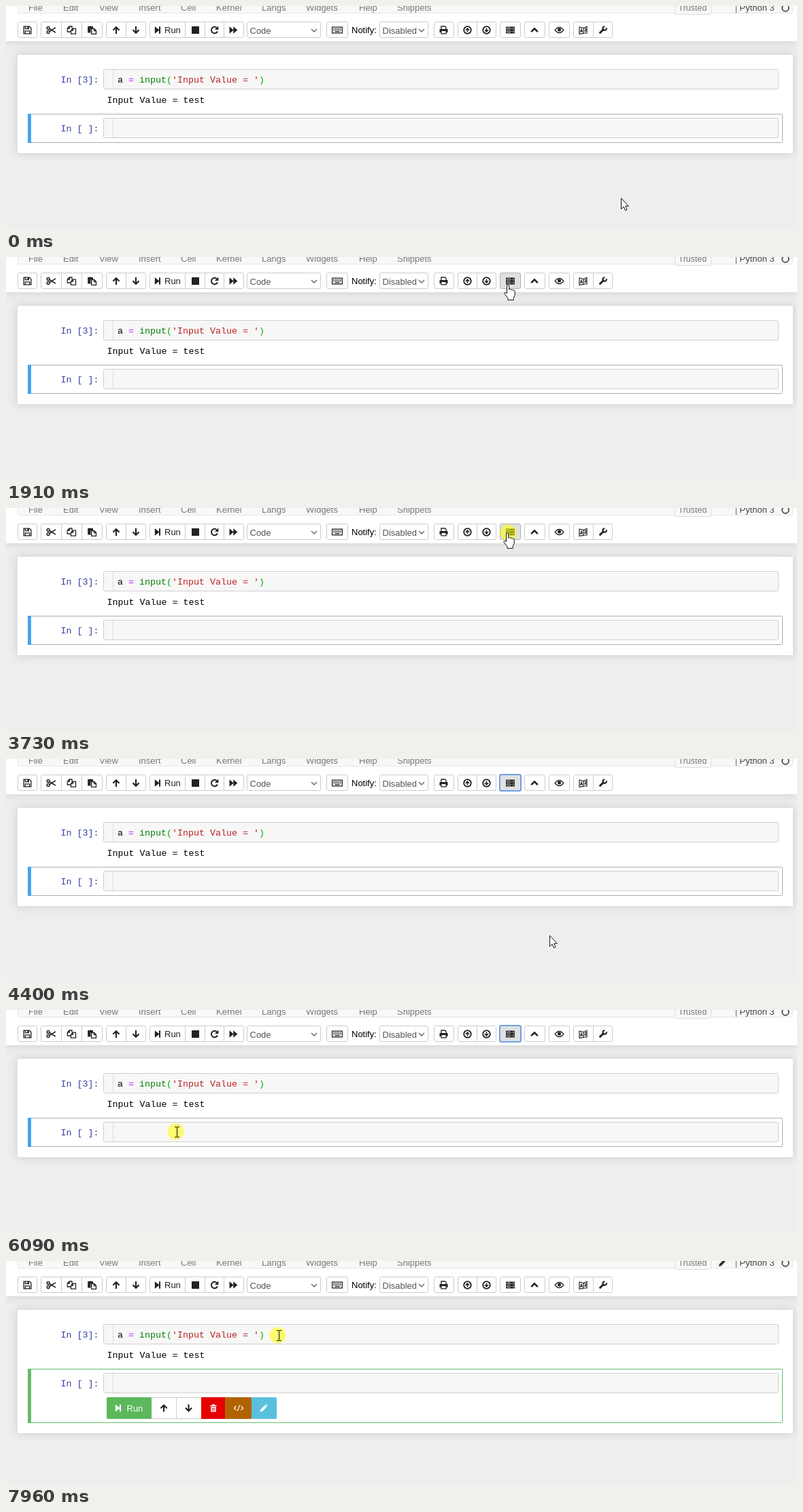
Animation of 1163 by 329 pixels, one loop 8000 ms. Source, as an HTML page:

```html
<!DOCTYPE html>
<html lang="en">
<head>
<meta charset="utf-8">
<title>Notebook with floating cell menu</title>
<style>
  html, body { margin: 0; width: 100%; height: 100%; overflow: hidden; background: #eee; }
  #stage { position: relative; width: 1163px; height: 329px; overflow: hidden; background: #eee; }
  #page, #header { position: absolute; background: #fff; box-shadow: 0 0 12px 1px rgba(87, 87, 87, .2); }
  #page { left: 17px; top: 72px; width: 1140px; height: 145px; }
  #header { left: 0; top: 0; width: 1163px; height: 52px; }
  svg { position: absolute; left: 0; top: 0; }
  text { font: 13px "Liberation Sans", Arial, sans-serif; white-space: pre; }
  .code { font: 13.33px "Liberation Mono", monospace; }
  .tip { font: 11.5px "Open Sans", "Noto Sans", sans-serif; }
</style>
</head>
<body>
<div id="stage">
  <div id="page"></div>
  <div id="header"></div>
  <svg id="art" width="1163" height="329" viewBox="0 0 1163 329"></svg>
</div>
<script>
const LOOP = 8000;
const $ = id => document.getElementById(id);

// ---- drawing helpers ----
const box = (x, y, w, h, fill, stroke = 'none', r = 0, extra = '') =>
  `<rect x="${x}" y="${y}" width="${w}" height="${h}" rx="${r}" fill="${fill}" stroke="${stroke}" ${extra}/>`;
const text = (x, y, s, fill = '#000', cls = '', extra = '') =>
  `<text x="${x}" y="${y}" fill="${fill}" class="${cls}" ${extra}>${s}</text>`;
const line = (d, w = 1.3, color = 'currentColor') =>
  `<path d="${d}" fill="none" stroke="${color}" stroke-width="${w}"/>`;
const solid = (d, color = 'currentColor') => `<path d="${d}" fill="${color}"/>`;
const at = (x, y, body, color = '#222') =>
  `<g transform="translate(${x} ${y})" color="${color}">${body}</g>`;

const up = line('M0 5.5V-4M-4.6 .3L0-4.3 4.6 .3', 2.1);
const down = `<g transform="scale(1 -1)">${up}</g>`;
const ring = '<circle r="5.3" fill="none" stroke="currentColor" stroke-width="1.8"/>';
const pencil = solid('M-5.5 5.5l.8-3.5L1.5-4.2l2.7 2.7-6.2 6.2zM2.3-5l1-1 2.7 2.7-1 1z');

const icons = {
  save: line('M-5.4-5.4h8.4l2.4 2.4v8.4h-10.8zM-3.2 5.4v-4h6.4v4M-3.2-5.4v3.6h5v-3.6') + solid('M0-5h2v3h-2z'),
  cut: line('M-2.5-2L6.5 3.6M-2.5 2L6.5-3.6', 1.7) +
    '<g fill="none" stroke="currentColor" stroke-width="1.5"><circle cx="-4.4" cy="-3" r="1.9"/><circle cx="-4.4" cy="3" r="1.9"/></g>',
  copy: line('M-1 5.6v-5l3-3h4v8zM2-2.4v3h-3M-1.5 2.5h-4.7v-5l3-3h3.7v3.2M-3.2-5.5v3h-3'),
  paste: solid('M-6.3-5.5h2.5q1-1.4 2 0h3.3v3h-3.5v6.5h-4.3z') + line('M-.8-2h4l2.8 2.8v5h-6.8zM3-2v3h3'),
  step: solid('M-4.2-5.2l6.2 4.7v-4.7h2v10.4h-2v-4.7l-6.2 4.7z'),
  stop: solid('M-5.5-5.5h11v11h-11z'),
  redo: line('M3.4-3.4A4.7 4.7 0 1 0 4.4 2', 2) + solid('M5.8-6v5.4h-5.4z'),
  skip: solid('M-6-5.2l5.8 5v-5l6 5.2-6 5.2v-5l-5.8 5z'),
  keys: line('M-7.4-4.4h14.8v8.8h-14.8z') +
    '<path d="M-5.5-2h11M-5.5 0h11" stroke="currentColor" stroke-width="1.3" stroke-dasharray="1.4 1"/>' + line('M-3.5 2.2h7'),
  print: solid('M-6-1.5h12v5h-2v-2h-8v2h-2z') + line('M-3.6-1.5v-4h5.5l1.7 1.7v2.3M-3.6 1.5v3.8h7.2v-3.8'),
  circleUp: ring + line('M0 3V-2M-2.6 .3L0-2.3 2.6 .3', 1.6),
  circleDown: ring + line('M0-3V2M-2.6-.3L0 2.3 2.6-.3', 1.6),
  list: [-5, -1.5, 2].map(y => box(-6.5, y, 13, 3, 'currentColor', 'none', .5) +
    line(`M-5 ${y + 1.5}h${y ? 5 : 3}M3.8 ${y + 1.5}h1.4`, .8, '#ddd')).join(''),
  chevron: line('M-4.8 2.6L0-2.2 4.8 2.6', 2.5),
  eye: line('M-6.3 0Q0-8 6.3 0Q0 8-6.3 0z') + '<circle cy="-.4" r="2.5" fill="currentColor"/>',
  lang: line('M-5.5-4.5l6 1.4v8l-6 1zM.5-3l5-2v9.5l-5 0', 1.2) +
    line('M-4 3.5l1.5-5 1.5 4.5M-3.5 2h2M2-2h3M2.3 2.3L4.8-1.5M2.2 0L5 2', 1.1),
  wrench: line('M-4.8 4.8L1.5-1.5', 3) + line('M5.4-3.2A2.8 2.8 0 1 1 2.8-5.3', 2.1),
  trash: solid('M-4.5-4.2h2.5l.8-1.5h2.4l.8 1.5h2.5v1.4h-9zM-3.8-2h7.6v7.6h-7.6z') + line('M-1.7-.8v5M0-.8v5M1.7-.8v5', .8, '#e60000'),
  tag: line('M-3.5-3.2L-6.6 0l3.1 3.2M3.5-3.2L6.6 0 3.5 3.2M1.4-4.4L-1.4 4.4', 1.2),
  up, down, pencil
};
const icon = (name, x, y = 35.5, color) => at(x, y, icons[name], color);

// Button group: left edge, right edge, inner dividers
const group = (x1, x2, ...cuts) => box(x1 + .5, 23.5, x2 - x1 - 1, 23, '#fff', '#ccc', 2) +
  cuts.map(x => line(`M${x + .5} 24v22`, 1, '#ccc')).join('');
const select = (x, w, label) => box(x + .5, 23.5, w, 23, '#fff', '#ccc', 2) +
  text(x + 4.5, 41, label, '#555') + at(x + w - 9, 36, line('M-4-2L0 2 4-2', 1.4), '#666');
const input = y => box(143.5, y + .5, 992, 29, '#f7f7f7', '#cfcfcf', 2) + line(`M157.5 ${y + 1}v28`, 1, '#ddd');

const menu = { File: 33, Edit: 84, View: 137, Insert: 195, Cell: 257, Kernel: 309, Langs: 376, Widgets: 441, Help: 519, Snippets: 575 };
const tools = { save: 31.5, cut: 66.5, copy: 96.5, paste: 126.5, up: 162, down: 191, step: 223, stop: 278.5,
  redo: 306.5, skip: 334.5, keys: 487, print: 643.5, circleUp: 678.5, circleDown: 706.5, chevron: 777,
  eye: 813.5, lang: 848.5, wrench: 877.5 };

const header =
  box(17.5, -20, 1139, 30.5, '#f8f8f8', '#e7e7e7', 2) +
  Object.entries(menu).map(([s, x]) => text(x, 7, s, '#777')).join('') +
  box(983.5, -12, 53, 24.5, '#f8f8f8', '#ddd', 2) +
  text(988.5, 7, 'Trusted', '#777', '', 'style="font-size:12.5px"') +
  line('M1073.5 0V10', 1, '#666') + text(1078.5, 7, 'Python 3', '#444') +
  '<circle cx="1146" cy="3" r="4.9" fill="none" stroke="#444" stroke-width="1.7"/>' +
  `<g id="pen">${icon('pencil', 1053.5, 2.5, '#333')}</g>`;

const toolbar =
  group(17, 46) + group(51, 142, 81, 111) + group(147, 206, 176) + group(211, 350, 263, 292, 320) +
  select(354, 108, 'Code') + group(471, 503) + text(508, 40, 'Notify:') + select(549, 71, 'Disabled') +
  group(629, 659) + group(664, 721, 692) + group(762, 793) + group(798, 829) + group(834, 892, 863) +
  Object.entries(tools).map(([n, x]) => icon(n, x)).join('') + text(233, 40, 'Run', '#222') +
  box(726.5, 23.5, 30, 23, '#fff', '#ccc', 2, 'id="menuBtn"') + icon('list', 741.5) +
  box(726, 23, 31, 24, 'none', '#6f9fe8', 2, 'id="focus" stroke-width="2"');

const span = (s, c) => `<tspan fill="${c}">${s}</tspan>`;
const cells =
  text(80.5, 112.5, 'In [3]:', '#303f9f', 'code') + input(93) +
  text(164, 112.5, 'a ' + span('=', '#aa22ff') + ' ' + span('input', '#008000') + span('(', '#0a0') +
    span("'Input Value = '", '#ba2121') + span(')', '#0a0'), '#000', 'code') +
  text(148.5, 142.5, 'Input Value = test', '#000', 'code') +
  box(32.5, 159.5, 1109, 42, '#fff', '#a5b1ae', 1, 'id="cell"') +
  box(32, 159, 5, 43, '#42a5f5', 'none', 0, 'id="bar"') +
  text(80.5, 184.5, 'In [ ]:', '#303f9f', 'code') + input(165) +
  box(164, 172, 1, 18, '#000', 'none', 0, 'id="caret"');

const floating = '<g id="floating">' +
  box(148.5, 201.5, 249, 31, '#fff', '#ccc', 2) + line('M250.5 202v30', 1, '#ccc') +
  box(148, 201, 66, 32, '#5cb85c', 'none', 2) + box(287, 201, 35, 32, '#e60000') +
  box(322, 201, 39, 32, '#b36200') + box(361, 201, 37, 32, '#5bc0de', 'none', 2) +
  icon('step', 165, 217, '#fff') + text(177.5, 222, 'Run', '#fff') +
  icon('up', 232, 217) + icon('down', 268.5, 217) + icon('trash', 305, 217, '#fff') +
  icon('tag', 342, 217, '#fff') + icon('pencil', 379, 217, '#fff') + '</g>';

const tooltip = '<g id="tooltip">' + box(738, 64, 122, 20, '#000', 'none', 0, 'opacity=".22"') +
  box(735.5, 61.5, 121, 19, '#fff', '#767676') + text(741, 75.5, 'Show Floating Menu', '#575757', 'tip') + '</g>';

const outline = 'fill="#fff" stroke="#111" stroke-linejoin="round"';
const pointer =
  '<circle id="click" r="12" fill="#ff0" opacity=".55"/><g id="pointer">' +
  `<path id="arrow" ${outline} d="M.5 .5v16l3.6-3.4 2.6 5.6 2.4-1.1-2.5-5.4h4.8z"/>` +
  '<path id="beam" fill="none" stroke="#111" d="M-3.5-7.5h3l.5 .5 .5-.5h3M0-7V7M-3.5 7.5h3l.5-.5 .5 .5h3"/>' +
  `<path id="hand" ${outline} d="M-3.5 12.5V.8q1.6-1.8 3.2 0V7q1.7-1.3 3 .4 1.8-.9 2.9 .7 2.3-.5 2.6 1.6v5.3l-2 4.3v3.2h-8.2v-2.7l-5-6.3q-.6-2 1.2-2.2z"/></g>`;

$('art').innerHTML = header + toolbar + cells + floating + tooltip + pointer;

// ---- motion ----
// Each move: start, end, number of steps, then [step, x, y] keys. No keys hides the pointer.
const moves = [
  [0, 0, 1, [0, 904, 283]],
  [70, 130, 2, [0, 882, 274], [1, 867, 267]],
  [440, 515, 2, [0, 858, 272], [1, 842, 280]],
  [590, 590, 1],
  [760, 1370, 9, [0, 736, 306], [2, 690, 205], [3, 686, 165], [5, 709, 117], [8, 743, 101]],
  [1600, 1980, 6, [0, 748, 92], [1, 751, 75], [3, 744, 45], [5, 737, 37]],
  [3160, 3160, 1, [0, 740, 37]],
  [4090, 4860, 11, [0, 752, 60], [2, 787, 140], [4, 799, 260], [6, 784, 296], [8, 735, 264], [10, 703, 218]],
  [4930, 5700, 11, [0, 694, 197], [1, 689, 180], [6, 430, 174], [10, 285, 180]],
  [5780, 6330, 8, [0, 271, 181], [4, 251, 180]],
  [7260, 7810, 8, [0, 260, 174], [3, 325, 137], [5, 380, 115], [7, 401, 110]]
];

function pointerAt(t) {
  const [t0, t1, n, ...keys] = moves.filter(m => m[0] <= t).pop();
  if (!keys.length) return null;
  const step = n > 1 ? Math.min(n - 1, Math.floor((t - t0 + 5) / ((t1 - t0) / (n - 1)))) : 0;
  const i = keys.findIndex(k => k[0] >= step);
  if (i < 0) return keys[keys.length - 1].slice(1);
  const b = keys[i], a = keys[i - 1] || b;
  const f = b[0] > a[0] ? (step - a[0]) / (b[0] - a[0]) : 1;
  return [1, 2].map(j => Math.round(a[j] + (b[j] - a[j]) * f));
}

const within = (v, lo, hi) => v >= lo && v < hi;
function shapeAt(x, y) {
  if (within(x, 726, 758) && within(y, 23, 48)) return 'hand';
  return within(y, 93, 123) || within(y, 128, 150) || within(y, 165, 195) ? 'beam' : 'arrow';
}

const show = (id, on) => $(id).setAttribute('visibility', on ? 'visible' : 'hidden');
const set = (id, attrs) => { for (const k in attrs) $(id).setAttribute(k, attrs[k]); };

function draw(t) {
  const pos = pointerAt(t);
  const shape = pos && shapeAt(...pos);
  const focused = within(t, 3790, 6160);
  const editing = t >= 6160;

  for (const s of ['arrow', 'beam', 'hand']) show(s, s === shape);
  if (pos) {
    set('pointer', { transform: `translate(${pos[0] + (shape === 'beam' ? .5 : shape === 'hand' ? -1 : 0)} ${pos[1]})` });
    set('click', { cx: pos[0] - 1.5, cy: pos[1] - .5 });
  }
  show('click', within(t, 3730, 3860) || within(t, 6090, 6240) || t >= 7960);

  const hot = focused || shape === 'hand';
  set('menuBtn', { fill: hot ? '#e0e0e0' : '#fff', stroke: hot ? '#adadad' : '#ccc' });
  show('focus', focused);
  show('tooltip', within(t, 2380, 3730));
  set('tooltip', { opacity: t < 2460 ? .5 : 1 });

  const grow = editing ? 37 : 0;
  $('page').style.height = 145 + grow + 'px';
  set('cell', { height: 42 + grow, stroke: editing ? '#66bb6a' : '#a5b1ae' });
  set('bar', { height: 43 + grow, fill: editing ? '#66bb6a' : '#42a5f5' });
  show('floating', editing);
  show('pen', editing);
  show('caret', within(t, 6160, 6710) || within(t, 7260, 7790));
}

const start = performance.now();
function tick() {
  draw((performance.now() - start) % LOOP);
  requestAnimationFrame(tick);
}
draw(0);
requestAnimationFrame(tick);
</script>
</body>
</html>
```
